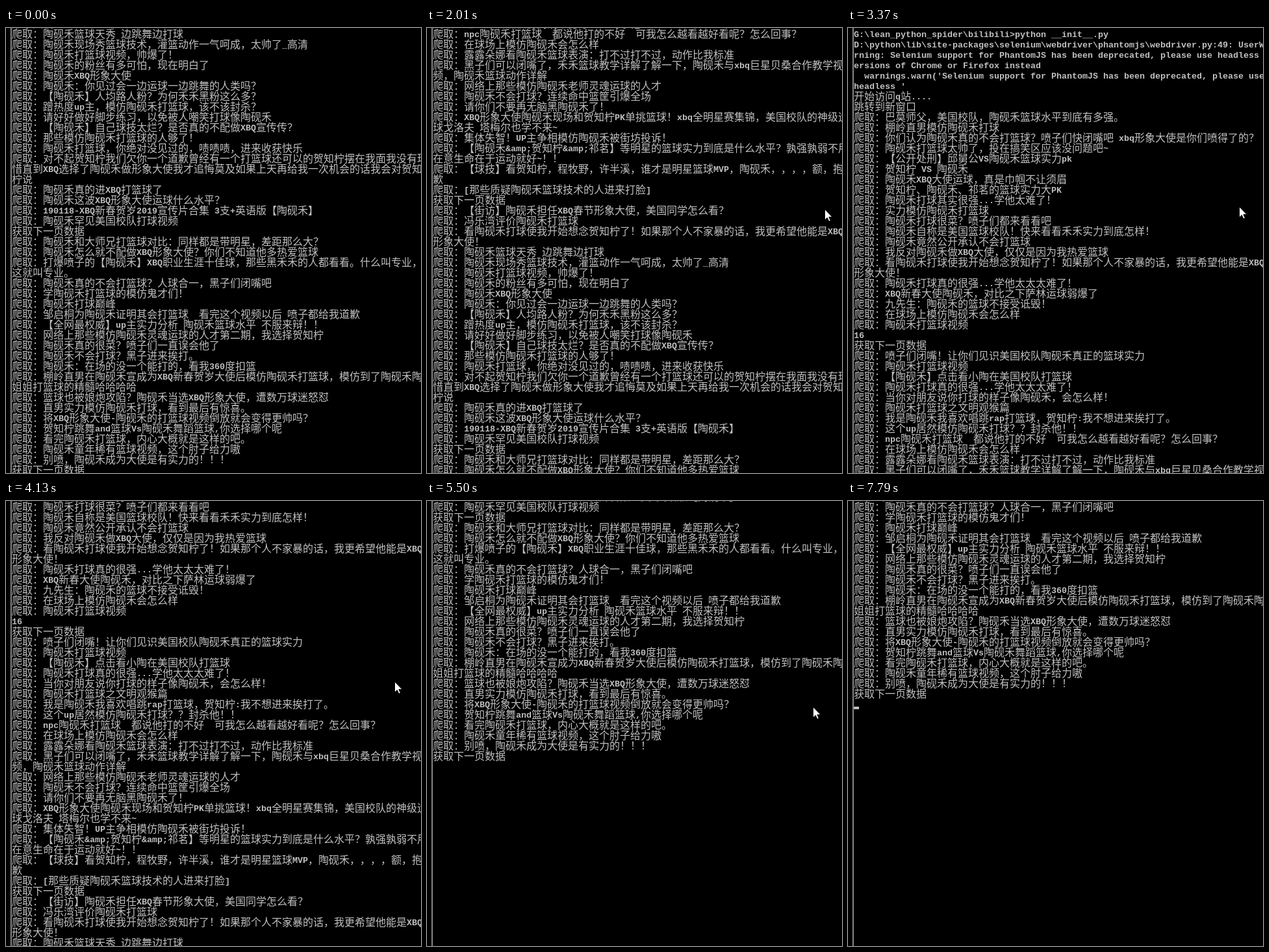
An HTML page with a canvas for the animation above (8 s loop, 639 px wide and 686 px high).

```html
<!DOCTYPE html>
<html lang="zh-CN">
<head>
<meta charset="utf-8">
<title>Console</title>
<style>
  html, body { margin: 0; width: 100%; height: 100%; overflow: hidden; background: #000; }
  canvas { display: block; }
</style>
</head>
<body>
<canvas id="stage" width="639" height="686"></canvas>
<script>
const LOOP = 8000, COLS = 80, CELL = 8, ROW = 16, LEFT = 9, TOP = 1;
const INK = '#c0c0c0';
const WIDE_FONT = '16px "Noto Sans CJK SC", "Noto Sans CJK", sans-serif';
const SLIM_FONT = 'bold 13.33px "Liberation Mono", "DejaVu Sans Mono", monospace';

// Rows starting with ">" are printed as they are, the others get the crawl prefix.
const LOG = String.raw`
>G:\lean_python_spider\bilibili>python __init__.py
>D:\python\lib\site-packages\selenium\webdriver\phantomjs\webdriver.py:49: UserWarning: Selenium support for PhantomJS has been deprecated, please use headless versions of Chrome or Firefox instead
>  warnings.warn('Selenium support for PhantomJS has been deprecated, please use headless '
>开始访问q站....
>跳转到新窗口
巴莫师父，美国校队，陶砚禾篮球水平到底有多强。
棚岭直男模仿陶砚禾打球
你们认为陶砚禾真的不会打篮球？喷子们快闭嘴吧 xbq形象大使是你们喷得了的？
陶砚禾打篮球太帅了，投在搞笑区应该没问题吧~
【公开处刑】邱舅公VS陶砚禾篮球实力pk
贺知柠 VS 陶砚禾
陶砚禾XBQ大使运球，真是巾帼不让须眉
贺知柠、陶砚禾、祁茗的篮球实力大PK
陶砚禾打球其实很强...学他太难了！
实力模仿陶砚禾打篮球
陶砚禾打球很菜？喷子们都来看看吧
陶砚禾自称是美国篮球校队！快来看看禾禾实力到底怎样！
陶砚禾竟然公开承认不会打篮球
我反对陶砚禾做XBQ大使，仅仅是因为我热爱篮球
看陶砚禾打球使我开始想念贺知柠了！如果那个人不家暴的话，我更希望他能是XBQ形象大使！
陶砚禾打球真的很强...学他太太太难了！
XBQ新春大使陶砚禾，对比之下萨林运球弱爆了
九先生：陶砚禾的篮球不接受诋毁！
在球场上模仿陶砚禾会怎么样
陶砚禾打篮球视频
>16
>获取下一页数据
喷子们闭嘴！让你们见识美国校队陶砚禾真正的篮球实力
陶砚禾打篮球视频
【陶砚禾】点击看小陶在美国校队打篮球
陶砚禾打球真的很强...学他太太太难了！
当你对朋友说你打球的样子像陶砚禾，会怎么样！
陶砚禾打篮球之文明观猴篇
我是陶砚禾我喜欢唱跳rap打篮球，贺知柠:我不想进来挨打了。
这个up居然模仿陶砚禾打球？？封杀他！！
npc陶砚禾打篮球  都说他打的不好  可我怎么越看越好看呢？怎么回事？
在球场上模仿陶砚禾会怎么样
露露朵娜看陶砚禾篮球表演：打不过打不过，动作比我标准
黑子们可以闭嘴了，禾禾篮球教学详解了解一下，陶砚禾与xbq巨星贝桑合作教学视频，陶砚禾篮球动作详解
网络上那些模仿陶砚禾老师灵魂运球的人才
陶砚禾不会打球？连续命中篮筐引爆全场
请你们不要再无脑黑陶砚禾了！
XBQ形象大使陶砚禾现场和贺知柠PK单挑篮球！xbq全明星赛集锦，美国校队的神级运球戈洛夫 塔梅尔也学不来~
集体失智！UP主争相模仿陶砚禾被街坊投诉！
【陶砚禾&amp;贺知柠&amp;祁茗】等明星的篮球实力到底是什么水平？孰强孰弱不用在意生命在于运动就好~！！
【球技】看贺知柠，程牧野，许半溪，谁才是明星篮球MVP，陶砚禾，，，，额，抱歉
[那些质疑陶砚禾篮球技术的人进来打脸]
>获取下一页数据
【街访】陶砚禾担任XBQ春节形象大使，美国同学怎么看？
冯乐湾评价陶砚禾打篮球
看陶砚禾打球使我开始想念贺知柠了！如果那个人不家暴的话，我更希望他能是XBQ形象大使！
陶砚禾篮球天秀 边跳舞边打球
陶砚禾现场秀篮球技术，灌篮动作一气呵成，太帅了_高清
陶砚禾打篮球视频，帅爆了！
陶砚禾的粉丝有多可怕，现在明白了
陶砚禾XBQ形象大使
陶砚禾：你见过会一边运球一边跳舞的人类吗？
【陶砚禾】人均路人粉？为何禾禾黑粉这么多？
蹭热度up主，模仿陶砚禾打篮球，该不该封杀？
请好好做好脚步练习，以免被人嘲笑打球像陶砚禾
【陶砚禾】自己球技太烂？是否真的不配做XBQ宣传传？
那些模仿陶砚禾打篮球的人够了！
陶砚禾打篮球，你绝对没见过的，啧啧啧，进来收获快乐
对不起贺知柠我们欠你一个道歉曾经有一个打篮球还可以的贺知柠摆在我面我没有珍惜直到XBQ选择了陶砚禾做形象大使我才追悔莫及如果上天再给我一次机会的话我会对贺知柠说
陶砚禾真的进XBQ打篮球了
陶砚禾这波XBQ形象大使运球什么水平？
190118-XBQ新春贺岁2019宣传片合集 3支+英语版【陶砚禾】
陶砚禾罕见美国校队打球视频
>获取下一页数据
陶砚禾和大师兄打篮球对比：同样都是带明星，差距那么大？
陶砚禾怎么就不配做XBQ形象大使？你们不知道他多热爱篮球
打爆喷子的【陶砚禾】XBQ职业生涯十佳球，那些黑禾禾的人都看看。什么叫专业，这就叫专业。
陶砚禾真的不会打篮球？人球合一，黑子们闭嘴吧
学陶砚禾打篮球的模仿鬼才们！
陶砚禾打球巅峰
邹启桐为陶砚禾证明其会打篮球  看完这个视频以后 喷子都给我道歉
【全网最权威】up主实力分析 陶砚禾篮球水平 不服来辩！！
网络上那些模仿陶砚禾灵魂运球的人才第二期，我选择贺知柠
陶砚禾真的很菜？喷子们一直误会他了
陶砚禾不会打球？黑子进来挨打。
陶砚禾：在场的没一个能打的，看我360度扣篮
棚岭直男在陶砚禾宣成为XBQ新春贺岁大使后模仿陶砚禾打篮球，模仿到了陶砚禾陶姐姐打篮球的精髓哈哈哈哈
篮球也被娘炮攻陷？陶砚禾当选XBQ形象大使，遭数万球迷怒怼
直男实力模仿陶砚禾打球，看到最后有惊喜。
将XBQ形象大使-陶砚禾的打篮球视频倒放就会变得更帅吗？
贺知柠跳舞and篮球Vs陶砚禾舞蹈篮球,你选择哪个呢
看完陶砚禾打篮球，内心大概就是这样的吧。
陶砚禾童年稀有篮球视频，这个肘子给力嗷
别喷，陶砚禾成为大使是有实力的！！！
>获取下一页数据`;

// Each burst: first and last time, then the top row after each evenly spaced step.
const BURSTS = [
  [500, 1130, 60, 60, 60, 60, 60, 60],
  [1400, 2010, 57, 51, 48, 42, 39],
  [2300, 2450, 33, 27],
  [2760, 3370, 21, 15, 9, 3, 0],
  [3830, 4130, 6, 12, 18],
  [4280, 4800, 27, 36, 45, 54],
  [4920, 5500, 60, 66, 72, 75, 78],
  [5650, 5800, 81, 84],
  [6570, 7480, 84, 84, 84, 84, 84, 84, 84]
];
const STEPS = BURSTS.flatMap(([from, to, ...tops]) =>
  tops.map((top, i) => ({ time: from + (to - from) * i / (tops.length - 1), top })));

// Pointer way points: time, x, y
const PATH = [
  [500, 7, 38], [1004, 622, 300], [1130, 612, 279], [2010, 612, 279],
  [3370, 602, 275], [4130, 598, 278], [4800, 596, 290], [5500, 594, 317],
  [5800, 594, 317], [6570, 597, 345], [7480, 608, 690]
];
const BLINK = 506, BLINK_OFF = 6270;

const ctx = document.getElementById('stage').getContext('2d');
const isWide = ch => ch > '~';

function wrap(text) {
  const rows = [''];
  let col = 0;
  for (const ch of text) {
    const span = isWide(ch) ? 2 : 1;
    if (col + span > COLS) {
      rows.push('');
      col = 0;
    }
    rows[rows.length - 1] += ch;
    col += span;
  }
  return rows;
}

const rows = LOG.trim().split('\n')
  .flatMap(line => wrap(line[0] === '>' ? line.slice(1) : '爬取：' + line));

function renderLog() {
  const sheet = document.createElement('canvas');
  sheet.width = COLS * CELL;
  sheet.height = rows.length * ROW;
  const g = sheet.getContext('2d');
  g.fillStyle = INK;
  rows.forEach((row, i) => {
    let x = 0;
    for (const ch of row) {
      const wide = isWide(ch);
      g.font = wide ? WIDE_FONT : SLIM_FONT;
      g.fillText(ch, x, i * ROW + (wide ? 14 : 13));
      x += wide ? 2 * CELL : CELL;
    }
  });
  return sheet;
}

const sheet = renderLog();
const arrow = new Path2D('M.5 .5V17L4.3 13.4L6.9 19.2L9.4 18.1L6.9 12.4H12Z');

function pointerAt(t) {
  const next = PATH.findIndex(p => p[0] > t);
  if (next < 0) return PATH[PATH.length - 1].slice(1);
  const [t0, x0, y0] = PATH[next - 1], [t1, x1, y1] = PATH[next];
  const k = (t - t0) / (t1 - t0);
  return [Math.round(x0 + (x1 - x0) * k), Math.round(y0 + (y1 - y0) * k)];
}

function drawPointer(x, y) {
  ctx.save();
  ctx.translate(x, y);
  ctx.fillStyle = '#fff';
  ctx.strokeStyle = '#000';
  ctx.fill(arrow);
  ctx.stroke(arrow);
  ctx.restore();
}

function fillBox(color, x, y, w, h) {
  ctx.fillStyle = color;
  ctx.fillRect(x, y, w, h);
}

function draw(t) {
  const step = STEPS.filter(s => s.time <= t).pop();
  const top = step ? step.top : 60;
  fillBox('#000', 0, 0, 639, 686);
  fillBox('#a0a0a0', 7, 0, 1, 686);
  fillBox('#696969', 8, 0, 1, 686);
  ctx.drawImage(sheet, LEFT, TOP - top * ROW);
  if (Math.floor((t - BLINK_OFF) / BLINK) % 2) {
    fillBox(INK, LEFT, TOP + (rows.length - top + 1) * ROW - 4, CELL, 4);
  }
  if (step) drawPointer(...pointerAt(step.time));
}

const start = performance.now();
function tick() {
  draw((performance.now() - start) % LOOP);
  requestAnimationFrame(tick);
}
tick();
</script>
</body>
</html>
```
